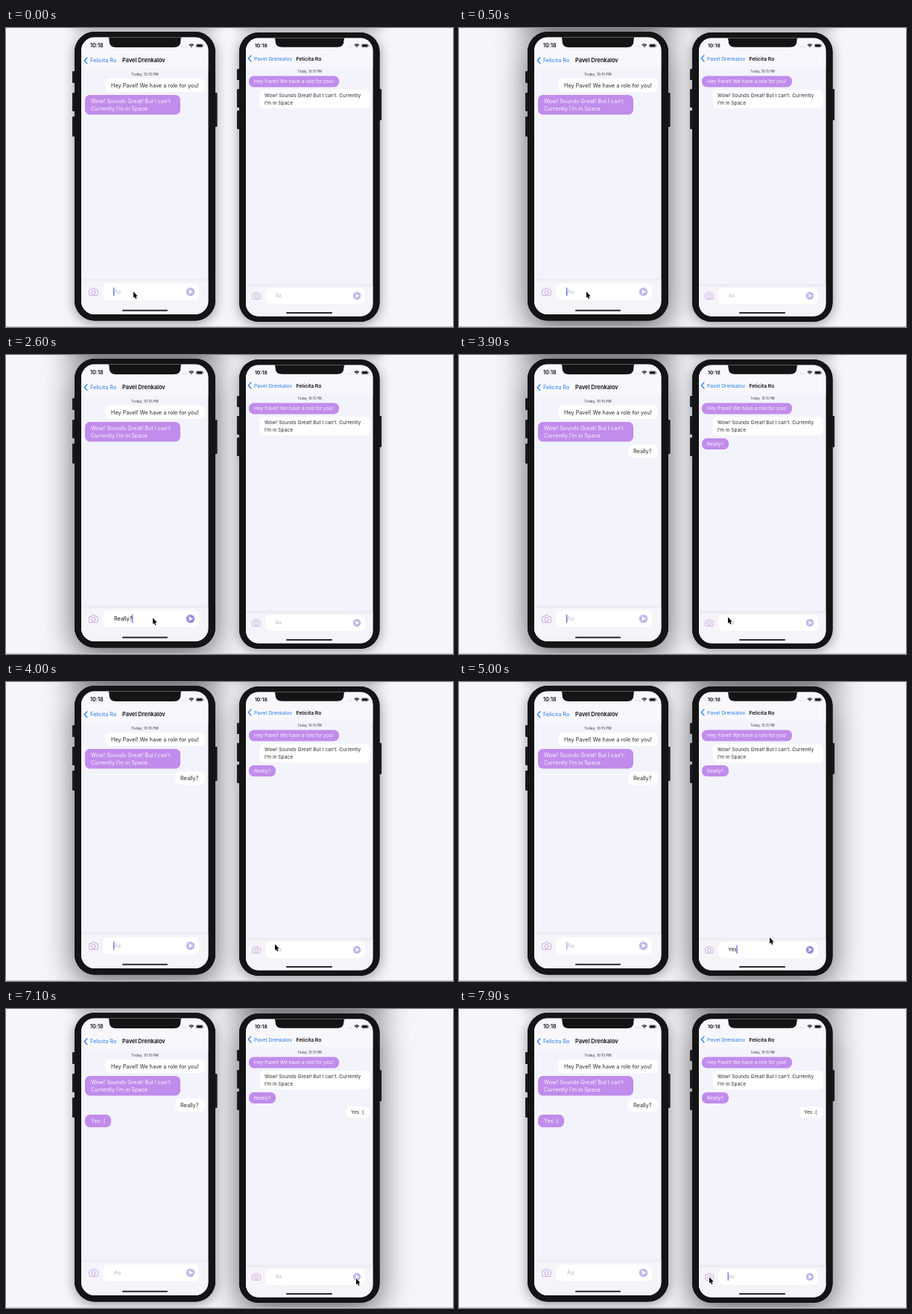
An HTML page with a canvas for the animation above (8 s loop, 600 by 402 pixels).

```html
<!DOCTYPE html>
<html lang="en">
<head>
<meta charset="utf-8">
<title>Two phones chatting</title>
<style>
html, body { margin: 0; width: 100%; height: 100%; overflow: hidden; background: #f5f6fb; }
canvas { display: block; width: 600px; height: 402px; }
</style>
</head>
<body>
<canvas id="stage"></canvas>
<script>
const W = 600, H = 402, LOOP = 8000;
const canvas = document.getElementById('stage');
const ctx = canvas.getContext('2d');
const dpr = window.devicePixelRatio || 1;
canvas.width = W * dpr;
canvas.height = H * dpr;

const SENT_LEFT = 3300, SENT_RIGHT = 6400;
const FOCUS_LEFT = 50, FOCUS_RIGHT = 3980;
const PURPLE = '#c18ceb', INK = '#2b2b31', BLUE = '#2a7de9', BEZEL = '#141416';
const ALICE = 'Felicita Ro', BOB = 'Pavel Drenkalov';
const HELLO = 'Hey Pavel! We have a role for you!';

const left = {
  x: 92, y: 5, w: 189, h: 388.5, r: 27,
  screen: { x: 101, y: 12.5, w: 170.5, h: 372.5, r: 18 },
  notch: { x: 138.5, w: 96, bottom: 26 },
  buttons: [[58, 16], [87, 25], [119, 27]], power: [87, 46],
  clock: [113, 26.2, 7.1], iconX: 236, iconY: 23.7,
  back: [ALICE, 113, 46.3, 7.3], title: [BOB, 156, 46.4, 7.45],
  date: [186.5, 64.3, 4.7], headY: 54, font: 7.3, footY: 338.5,
  field: { x: 130, y: 343.5, w: 129, h: 22.5 },
  draft: [145, 357.4], cam: [117.5, 355, 1], send: [247.5, 354.6, 5.7],
  home: [156, 217, 379.8],
  keys: [900, 1200, 1300, 1600, 1800, 2000, 2300], word: 'Really?', sentAt: SENT_LEFT,
  bubbles: [
    { box: [133, 68, 134, 18], x: 141, y: [79.5], text: [HELLO] },
    { box: [106, 90, 128, 26.5], x: 114, y: [100.9, 110.6], mine: true,
      text: ['Wow! Sounds Great! But I can’t.', 'Currently I’m in Space'] },
    { box: [227, 120.5, 40, 17.5], x: 234, y: [131.8], text: ['Really?'], at: SENT_LEFT },
    { box: [106, 142, 35, 17], x: 114, y: [153], text: ['Yes :('], mine: true, at: SENT_RIGHT + 100 }
  ]
};

const right = {
  x: 313, y: 6, w: 188.5, h: 389, r: 26,
  screen: { x: 322, y: 13.5, w: 170.5, h: 374, r: 17 },
  notch: { x: 361.5, w: 92, bottom: 25.8 },
  buttons: [[55, 15], [82, 25], [111, 25]], power: [82, 42],
  clock: [334, 26, 6.8], iconX: 458, iconY: 23.7,
  back: [BOB, 333, 43.5, 6.75], title: [ALICE, 389.5, 43.5, 6.85],
  date: [407.5, 59.7, 4.2], headY: 51, font: 6.6, footY: 346,
  field: { x: 348, y: 349.5, w: 134, h: 21.5 },
  draft: [361.5, 362.4], cam: [336, 360.3, 0.92], send: [471, 360, 5.2],
  home: [376, 438, 383],
  keys: [4700, 4800, 5000, 5200, 5400, 5700], word: 'Yes :(', sentAt: SENT_RIGHT,
  bubbles: [
    { box: [326, 64.5, 121, 15], x: 333, y: [74.4], text: [HELLO], mine: true },
    { box: [340.5, 83, 148.5, 25], x: 347, y: [93.2, 102.5],
      text: ['Wow! Sounds Great! But I can’t. Currently', 'I’m in Space'] },
    { box: [326, 112, 36, 15], x: 333, y: [122], text: ['Really?'], mine: true, at: SENT_LEFT + 100 },
    { box: [456.5, 131, 32, 15.5], x: 463, y: [141.2], text: ['Yes :('], at: SENT_RIGHT }
  ]
};

// time, x, y of the pointer tip
const pointerPath = [
  [0, 171, 354], [2500, 171, 354], [2600, 197, 353], [3100, 246, 354],
  [3400, 246, 354], [3900, 361, 352], [4150, 361, 352], [4500, 417, 343],
  [5500, 417, 343], [6000, 476, 362], [7000, 476, 362], [7800, 336, 360], [LOOP, 336, 360]
];

const clamp = v => Math.max(0, Math.min(1, v));
const mix = (a, b, k) => a + (b - a) * k;
const smooth = v => { v = clamp(v); return v * v * (3 - 2 * v); };

function rounded(x, y, w, h, r, fill) {
  ctx.beginPath();
  ctx.roundRect(x, y, w, h, r);
  if (fill) { ctx.fillStyle = fill; ctx.fill(); }
}

function text(str, x, y, size, color, weight = 400, align = 'left') {
  ctx.font = `${weight} ${size}px Inter, Roboto, sans-serif`;
  ctx.textAlign = align;
  ctx.fillStyle = color;
  ctx.fillText(str, x, y);
}

function line(points, color, width) {
  ctx.beginPath();
  points.forEach(([x, y], i) => i ? ctx.lineTo(x, y) : ctx.moveTo(x, y));
  ctx.strokeStyle = color;
  ctx.lineWidth = width;
  ctx.lineCap = ctx.lineJoin = 'round';
  ctx.stroke();
}

// The window in front casts a wider, deeper shadow.
function focus(p, t) {
  const toRight = smooth((t - FOCUS_RIGHT) / 120);
  return p === right ? toRight : smooth((t - FOCUS_LEFT) / 150) * (1 - toRight);
}

function drawShadow(p, k) {
  ctx.save();
  ctx.shadowColor = `rgba(15,15,18,${mix(0.42, 0.65, k)})`;
  ctx.shadowBlur = mix(16, 42, k) * dpr;
  ctx.shadowOffsetY = mix(3, 11, k) * dpr;
  rounded(p.x - 2, -300, p.w + 4, 297, 4, '#555');
  rounded(p.x, p.y, p.w, p.h, p.r, BEZEL);
  ctx.restore();
}

function drawBody(p) {
  for (const [y, h] of p.buttons) rounded(p.x - 3, y, 5, h, 1.2, '#1b1b1e');
  rounded(p.x + p.w - 2, p.power[0], 4.6, p.power[1], 1.2, '#1b1b1e');
  rounded(p.x, p.y, p.w, p.h, p.r, BEZEL);
}

function drawStatus(p) {
  const { x, w, bottom } = p.notch, top = p.screen.y - 1;
  ctx.fillStyle = BEZEL;
  ctx.beginPath();
  ctx.moveTo(x - 4, top);
  ctx.quadraticCurveTo(x, top, x, top + 4);
  ctx.lineTo(x, bottom - 9);
  ctx.quadraticCurveTo(x, bottom, x + 9, bottom);
  ctx.lineTo(x + w - 9, bottom);
  ctx.quadraticCurveTo(x + w, bottom, x + w, bottom - 9);
  ctx.lineTo(x + w, top + 4);
  ctx.quadraticCurveTo(x + w, top, x + w + 4, top);
  ctx.fill();

  text('10:18', ...p.clock, '#0c0c0e', 600);
  const ix = p.iconX, iy = p.iconY;
  for (let i = 0; i < 4; i++) rounded(ix + i * 1.9, iy + 0.8, 1, 1, 0.5, '#b4b4bc');
  ctx.strokeStyle = '#111';
  ctx.lineWidth = 1.1;
  ctx.lineCap = 'butt';
  for (const r of [1.1, 2.8, 4.4]) {
    ctx.beginPath();
    ctx.arc(ix + 12.8, iy + 2.5, r, -Math.PI * 0.75, -Math.PI * 0.25);
    ctx.stroke();
  }
  rounded(ix + 19.2, iy - 2.2, 9, 4.5, 1.3);
  ctx.lineWidth = 0.5;
  ctx.strokeStyle = '#555';
  ctx.stroke();
  rounded(ix + 19.9, iy - 1.5, 7.6, 3.1, 0.8, '#080808');
  rounded(ix + 28.7, iy - 0.7, 0.7, 1.5, 0.3, '#555');
}

function drawHeader(p) {
  const [name, x, y, size] = p.back;
  line([[x - 4.1, y - 6.5], [x - 7.7, y - 2.6], [x - 4.1, y + 1.3]], BLUE, 1.3);
  text(name, x, y, size, BLUE);
  text(...p.title, '#0d0d10', 600);
  text('Today, 10:15 PM', ...p.date, '#66666e', 600, 'center');
}

function drawBubble(p, b, t) {
  const age = b.at === undefined ? 1 : smooth((t - b.at + 60) / 200);
  if (!age) return;
  ctx.save();
  ctx.globalAlpha = age;
  rounded(...b.box, 6.5, b.mine ? PURPLE : '#fff');
  b.text.forEach((s, i) => text(s, b.x, b.y[i], p.font, b.mine ? '#fbf3ff' : INK));
  ctx.restore();
}

function drawCamera([x, y, k]) {
  ctx.save();
  ctx.translate(x, y);
  ctx.scale(k, k);
  ctx.lineWidth = 0.9;
  ctx.lineJoin = 'round';
  ctx.strokeStyle = '#c9a0e4';
  ctx.beginPath();
  ctx.moveTo(-4.7, -3.3);
  ctx.lineTo(-2.8, -3.3);
  ctx.lineTo(-1.9, -4.9);
  ctx.lineTo(1.9, -4.9);
  ctx.lineTo(2.8, -3.3);
  ctx.lineTo(4.7, -3.3);
  ctx.quadraticCurveTo(5.8, -3.3, 5.8, -2.2);
  ctx.lineTo(5.8, 3.5);
  ctx.quadraticCurveTo(5.8, 4.6, 4.7, 4.6);
  ctx.lineTo(-4.7, 4.6);
  ctx.quadraticCurveTo(-5.8, 4.6, -5.8, 3.5);
  ctx.lineTo(-5.8, -2.2);
  ctx.quadraticCurveTo(-5.8, -3.3, -4.7, -3.3);
  ctx.stroke();
  ctx.beginPath();
  ctx.arc(0, 0.5, 2.6, 0, Math.PI * 2);
  ctx.stroke();
  ctx.restore();
}

function drawSend([x, y, r], active) {
  const g = ctx.createLinearGradient(x - r, y - r, x + r, y + r);
  g.addColorStop(0, active ? '#ab93e0' : '#d0b6ea');
  g.addColorStop(1, active ? '#7f90da' : '#b5b8e6');
  ctx.fillStyle = g;
  ctx.beginPath();
  ctx.arc(x, y, r, 0, Math.PI * 2);
  ctx.fill();
  ctx.fillStyle = '#fff';
  ctx.beginPath();
  ctx.moveTo(x - r * 0.45, y - r * 0.55);
  ctx.lineTo(x + r * 0.65, y);
  ctx.lineTo(x - r * 0.45, y + r * 0.55);
  ctx.lineTo(x - r * 0.2, y);
  ctx.fill();
}

function blink(t) {
  const phase = ((t % 1200) + 1200) % 1200;
  return smooth((phase - 100) / 200) * (1 - smooth((phase - 600) / 100));
}

function caretAlpha(p, t) {
  if (p === left) {
    if (t < 900) return 1 - smooth((t - 650) / 100);
    return t < SENT_LEFT ? 1 : blink(t);
  }
  if (t < 4200) return 0;
  if (t < 5900) return 1;
  return t < SENT_RIGHT ? 1 - smooth((t - 5900) / 150) : blink(t - 7500);
}

function drawFooter(p, t) {
  const { x, y, w, h } = p.field, s = p.screen;
  const g = ctx.createLinearGradient(0, p.footY - 3, 0, p.footY + 2);
  g.addColorStop(0, 'rgba(225,226,236,0)');
  g.addColorStop(0.7, '#ebebf3');
  g.addColorStop(1, '#f5f4f9');
  ctx.fillStyle = g;
  ctx.fillRect(s.x, p.footY - 3, s.w, s.h);
  drawCamera(p.cam);
  rounded(x, y, w, h, 7, '#fff');

  const count = t < p.sentAt ? p.keys.filter(k => k <= t).length : 0;
  const typed = p.word.slice(0, count);
  const [tx, ty] = p.draft;
  text(typed || 'Aa', tx, ty, p.font, typed ? '#111' : '#b9b9c3');
  const cx = tx + (typed ? ctx.measureText(typed).width - 0.3 : -0.9);
  ctx.globalAlpha = caretAlpha(p, t);
  ctx.fillStyle = '#5263cf';
  ctx.fillRect(cx, ty - 8.3, 1.2, 11);
  ctx.globalAlpha = 1;
  drawSend(p.send, count > 0);

  const [a, b, hy] = p.home;
  line([[a + 1, hy], [b - 1, hy]], '#2b2b2e', 2.1);
}

function drawPhone(p, t) {
  drawBody(p);
  const s = p.screen;
  ctx.save();
  rounded(s.x, s.y, s.w, s.h, s.r, '#f3f3fc');
  ctx.clip();
  const g = ctx.createLinearGradient(0, p.headY - 3, 0, p.headY + 3);
  g.addColorStop(0, '#f8f8fc');
  g.addColorStop(1, '#f3f3fc');
  ctx.fillStyle = g;
  ctx.fillRect(s.x, s.y, s.w, p.headY + 3 - s.y);
  drawStatus(p);
  drawHeader(p);
  p.bubbles.forEach(b => drawBubble(p, b, t));
  drawFooter(p, t);
  ctx.restore();
}

function drawPointer(t) {
  const i = pointerPath.findIndex(k => k[0] > t);
  const [t0, x0, y0] = pointerPath[i - 1], [t1, x1, y1] = pointerPath[i];
  const k = smooth((t - t0) / (t1 - t0));
  ctx.save();
  ctx.translate(mix(x0, x1, k), mix(y0, y1, k) + 0.4);
  const shape = [[0, 0], [0, 8.4], [1.8, 6.8], [3.1, 9.8], [4.5, 9.2], [3.2, 6.3], [5.6, 6.1], [0, 0]];
  line(shape, '#fff', 1.1);
  ctx.fillStyle = '#050505';
  ctx.fill();
  ctx.restore();
}

function draw(now) {
  const t = now % LOOP;
  ctx.setTransform(dpr, 0, 0, dpr, 0, 0);
  ctx.fillStyle = '#f5f6fb';
  ctx.fillRect(0, 0, W, H);
  for (const p of [left, right]) drawShadow(p, focus(p, t));
  for (const p of [left, right]) drawPhone(p, t);
  ctx.fillStyle = '#c4c4c8';
  ctx.fillRect(0, 401, W, 1);
  drawPointer(t);
}

let start;
function tick(now) {
  if (start === undefined) start = now;
  draw(Math.max(0, now - start));
  requestAnimationFrame(tick);
}
draw(0);
requestAnimationFrame(tick);
</script>
</body>
</html>
```
